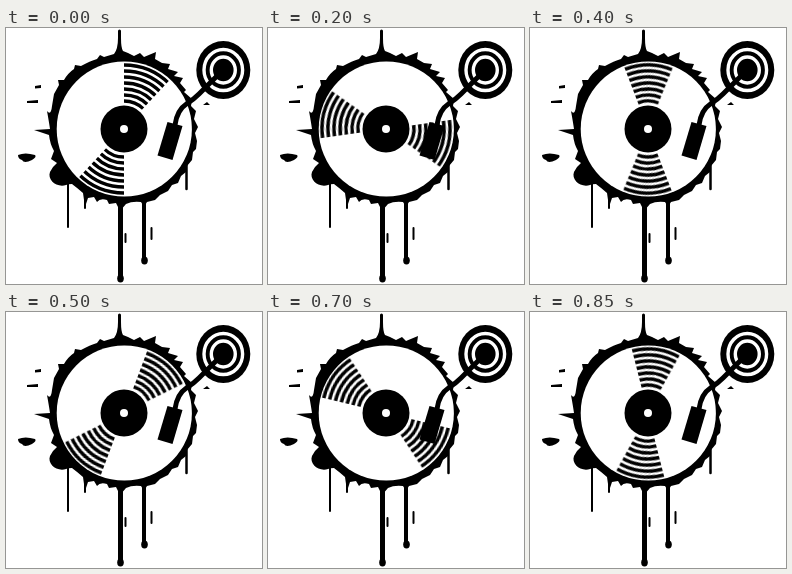
These frames come from a looping animation (256 px wide and 256 px high, 0.9 s). An HTML page:

```html
<!DOCTYPE html>
<html lang="en">
<head>
<meta charset="utf-8">
<title>Turntable</title>
<style>
  html, body { margin: 0; width: 100%; height: 100%; overflow: hidden; background: #fff; }
  svg { display: block; width: 100vw; height: 100vh; }
  .record { transform-origin: 118px 101px; animation: spin 900ms infinite; }
  /* one pose every 50 ms, at a slightly uneven speed */
  @keyframes spin {
    0% { transform: rotate(0); animation-timing-function: steps(2); }
    11.111% { transform: rotate(43.5deg); animation-timing-function: steps(6); }
    44.444% { transform: rotate(159deg); animation-timing-function: steps(10); }
    100% { transform: rotate(366.5deg); }
  }
  .line { fill: none; stroke: #000; stroke-linecap: round; stroke-linejoin: round; }
  .grooves { fill: none; stroke: #000; stroke-width: 3.3; }
</style>
</head>
<body>
<svg viewBox="0 0 256 256">
  <defs>
    <!-- two opposite 43 degree wedges -->
    <clipPath id="wedges">
      <path d="M118 101V21H192.600L118 101ZM118 101V181H43.400Z"/>
    </clipPath>
  </defs>

  <!-- ink rim -->
  <path d="M44 101Q43 94 41 83Q45 88 46 78L48 66L53 57L52 52L58 52Q62 45 68 41L69 37L75 38Q84 33 91 31L94 27L98 29L108 26Q112 21 112 10H115Q115 20 117 23L122 25L128 28L134 25L138 29L150 24L149 31L156 35L164 36L162 41L172 44L168 48L177 50L174 55L180 62L178 64L186 71L185 78L190 83L188 91L192 99L189 105L191 113L190 121L187 124L186 132L181 138L180 144L175 148L172 155L166 157L162 163L154 167L149 172L141 174L138 179L135 174Q126 173 120 176L114 183L110 175L103 176L101 172Q94 170 91 174L88 169L82 170L79 179L77 165Q70 159 66 156Q62 156 60 157C51 160 41 152 44 144Q46 139 51 135L45 131L48 123Q44 116 43 107L28 102Z"/>

  <!-- drips -->
  <g class="line">
    <path stroke-width="3" d="M113.500 3V16"/>
    <path stroke-width="2" d="M62 152V199M79 166V180M119.500 206V214M145.500 200V211"/>
    <path stroke-width="5" d="M114.500 172V250"/>
    <path stroke-width="4" d="M138 170V231"/>
    <path stroke-width="2.500" d="M180.500 137V161"/>
  </g>
  <ellipse cx="114.500" cy="250.500" rx="3.300" ry="4"/>
  <ellipse cx="138.500" cy="232.500" rx="3.300" ry="4"/>

  <!-- loose spots -->
  <path d="M12 127Q19 124 29 127Q31 129 26 132Q18 136 16 132Q12 131 12 127ZM29 58L35 57V60L29 60.500ZM21 73L32 72V75L21 75ZM197 77L201 74L204 77Z"/>

  <circle cx="118.300" cy="101" r="67.600" fill="#fff"/>
  <g class="record">
    <g class="grooves" clip-path="url(#wedges)">
      <circle cx="118" cy="101" r="64"/>
      <circle cx="118" cy="101" r="58"/>
      <circle cx="118" cy="101" r="52"/>
      <circle cx="118" cy="101" r="46"/>
      <circle cx="118" cy="101" r="40"/>
      <circle cx="118" cy="101" r="34"/>
      <circle cx="118" cy="101" r="28"/>
    </g>
  </g>
  <circle cx="118" cy="101" r="23.500"/>
  <circle cx="118" cy="101" r="4" fill="#fff"/>

  <!-- tone arm -->
  <ellipse cx="217.300" cy="42" rx="27" ry="29"/>
  <g fill="none" stroke="#fff" stroke-width="3.400">
    <ellipse cx="217.300" cy="42" rx="19.300" ry="20.500"/>
    <ellipse cx="217.300" cy="42" rx="12" ry="13"/>
  </g>
  <path class="line" stroke-width="5" d="M217 42L193 66Q187 72 181 75.500Q171 82 169 97"/>
  <path d="M161.500 94L176.500 98L166.500 132L151.500 127.500Z"/>
</svg>
</body>
</html>
```
